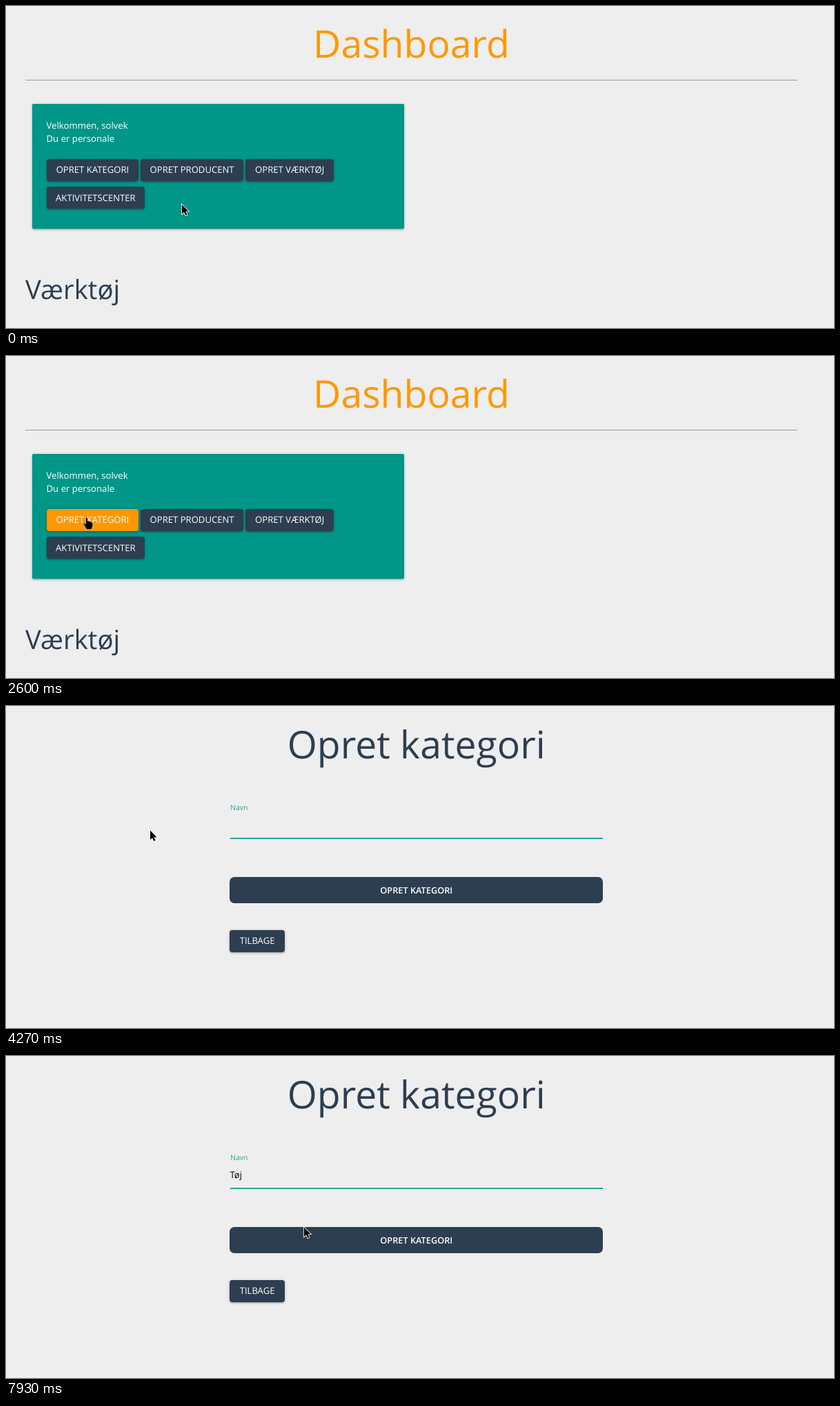
An HTML page for the animation above (8 s loop, 1200 px wide and 467 px high).

```html
<!DOCTYPE html>
<html lang="da">
<head>
<meta charset="utf-8">
<title>Dashboard</title>
<style>
  html, body { margin: 0; width: 100%; height: 100%; overflow: hidden; background: #eee; }
  body { font-family: "Open Sans", "Noto Sans", sans-serif; text-rendering: geometricPrecision; }
  #stage { position: absolute; left: 0; top: 0; width: 1200px; height: 467px; overflow: hidden; }
  #stage div { position: absolute; box-sizing: border-box; }
  .text { line-height: 0; white-space: nowrap; }
  .raised {
    box-shadow: 0 1.7px 1.7px rgba(0,0,0,.14), 0 2.5px .8px -1.7px rgba(0,0,0,.12), 0 .8px 4.2px rgba(0,0,0,.2);
  }
  .btn { background: #2c3e50; border-radius: 4px; }
  .panel { background: #fff; border: 1px solid #b4b4b4; }
  svg { position: absolute; left: 0; top: 0; overflow: visible; }
</style>
</head>
<body>
<div id="stage"></div>
<script>
const LOOP = 8000, FPS = 15;
const DARK = '#2c3e50', ORANGE = '#ff9800', TEAL = '#26a69a', GREY = '#9e9e9e';
const BODY = 13.2, TITLE = 55.3;
const stage = document.getElementById('stage');

function add(parent, cls = '') {
  const el = document.createElement('div');
  el.className = cls;
  parent.appendChild(el);
  return el;
}

function box(parent, x, y, w, h, color, cls) {
  const el = add(parent, cls);
  el.style.cssText = `left:${x}px;top:${y}px;width:${w}px;height:${h}px;` + (color ? `background:${color}` : '');
  return el;
}

// y is the baseline
function text(parent, str, x, y, size, color, extra = '') {
  const el = add(parent, 'text');
  el.textContent = str;
  el.style.cssText = `left:${x}px;top:${y - 0.388 * size}px;font-size:${size}px;color:${color};${extra}`;
  return el;
}

function centered(parent, str, x, w, y, size, color, extra = '') {
  return text(parent, str, x, y, size, color, `width:${w}px;text-align:center;${extra}`);
}

function button(parent, str, x, y, w) {
  const el = box(parent, x, y, w, 32, '', 'btn raised');
  centered(el, str, 0, w, 20.5, 13.1, '#fff');
  return el;
}

const dash = add(stage);
centered(dash, 'Dashboard', 28, 1119, 76, TITLE, ORANGE);
box(dash, 28, 107, 1119, 1, '#9a9a9a');
const card = box(dash, 37.7, 141.7, 539.6, 181.8, '#009688', 'raised');
card.style.borderRadius = '1.7px';
text(dash, 'Velkommen, solvek', 58.5, 178, BODY, '#fff');
text(dash, 'Du er personale', 58.5, 197, BODY, '#fff');
const category = button(dash, 'OPRET KATEGORI', 58.5, 222, 133.8);
button(dash, 'OPRET PRODUCENT', 195.2, 222, 148.8);
button(dash, 'OPRET VÆRKTØJ', 347.2, 222, 128);
button(dash, 'AKTIVITETSCENTER', 58.5, 262.3, 142.8);
text(dash, 'Værktøj', 28, 426, 38.4, DARK);

const form = add(stage);
centered(form, 'Opret kategori', 324.5, 540.5, 77, TITLE, DARK);
const label = text(form, 'Navn', 324.5, 177, BODY, GREY);
const value = text(form, '', 324.5, 177, BODY, '#000');
const line = box(form, 324.5, 191, 540.5, 1, GREY);
const submit = box(form, 324.2, 248.2, 540.8, 37.8, DARK);
submit.style.borderRadius = '7px';
centered(form, 'OPRET KATEGORI', 324.5, 540.5, 272, 12.74, '#fff', 'font-weight:600');
button(form, 'TILBAGE', 324.2, 325, 79.8);
const caret = box(form, 324, 162, 1, 18, '#000');

const hints = box(form, 325, 193, 168, 111, '', 'panel');
['Test', 'Træ', 'Tape', 'Tang', 'Tov'].forEach((word, i) => text(hints, word, 7, 18 + i * 21, 11.5, '#222'));

const shapes = {
  arrow: '<path d="M0 0V13.6L3.1 10.8L5.3 15.6L7.5 14.6L5.4 9.8H9.6Z" fill="#000" stroke="#fff" stroke-width="1.6" paint-order="stroke"/>',
  hand: '<path d="M-1.5 1.2Q0-.7 1.5 1.2V5.4Q3 4.6 4 6Q5.6 5.2 6.5 6.8Q8.6 6.4 8.8 8.6V12Q8.6 14 7.5 15.4V17.5H-.8V15.8Q-2.5 14-4.8 9.9Q-4.6 7.6-2.6 8.8L-1.5 10Z" fill="#000" stroke="#fff" stroke-width=".5"/>',
  beam: '<path d="M-2.5-6H-.6L0-5.5L.6-6H2.5M0-5.5V5.5M-2.5 6H-.6L0 5.5L.6 6H2.5" fill="none" stroke="#222"/>'
};
stage.insertAdjacentHTML('beforeend', '<svg width="1200" height="467"><g id="cursor"></g></svg>');
const cursor = document.getElementById('cursor');

// tick, x, y, and an optional control point for a curved approach
const path = [
  [0, 255, 288], [6, 124, 235], [21, 124, 235], [24, 117, 235], [32, 117, 235],
  [34, 116, 234], [38, 116, 234], [39, 117, 234], [45, 117, 234], [52, 403, 171],
  [55, 403, 171], [64, 209, 180.5, 215, 482], [111, 209, 180.5], [119, 432, 248.5]
];

const mix = (a, b, u) => a + (b - a) * u;
const clamp = u => Math.max(0, Math.min(1, u));
const easeOut = u => u * (2 - u);
const smooth = u => u * u * (3 - 2 * u);
const inside = (p, x, y, w, h) => p.x >= x && p.x <= x + w && p.y >= y && p.y <= y + h;

function cursorAt(k) {
  const i = path.findIndex(p => p[0] >= k);
  if (i < 1) return { x: path[0][1], y: path[0][2] };
  const [k0, x0, y0] = path[i - 1];
  const [k1, x1, y1, cx = (x0 + x1) / 2, cy = (y0 + y1) / 2] = path[i];
  const raw = (k - k0) / (k1 - k0);
  const u = i === 1 ? easeOut(raw) : smooth(raw);
  const bend = (a, c, b) => mix(mix(a, c, u), mix(c, b, u), u);
  return { x: bend(x0, cx, x1), y: bend(y0, cy, y1) };
}

// blinking restarts with every key press
function caretOn(k) {
  if (k < 56) return false;
  const start = [105, 102, 96, 56].find(s => k >= s);
  return Math.floor((k - start) / 8) % 2 === 0;
}

function draw(now) {
  const k = Math.floor(((now % LOOP) + 5) * FPS / 1000) % (LOOP * FPS / 1000);
  const onForm = k >= 42;
  dash.style.display = onForm ? 'none' : 'block';
  form.style.display = onForm ? 'block' : 'none';

  const p = cursorAt(k);
  const hover = !onForm && inside(p, 58.5, 222, 133.8, 32);
  category.style.background = hover ? ORANGE : DARK;

  const f = easeOut(clamp((k - 55) / 3));
  const focused = k >= 56;
  label.style.transformOrigin = '0 0';
  label.style.transform = `translateY(${-24.7 * f}px) scale(${mix(1, 0.8, f)})`;
  label.style.color = line.style.background = focused ? TEAL : GREY;
  line.style.height = focused ? '2px' : '1px';

  const typed = 'Tøj'.slice(0, k >= 105 ? 3 : k >= 102 ? 2 : k >= 96 ? 1 : 0);
  value.textContent = typed;
  caret.style.left = 324 + value.offsetWidth + 'px';
  caret.style.display = caretOn(k) ? 'block' : 'none';
  hints.style.display = k >= 96 && k < 102 ? 'block' : 'none';

  let kind = 'arrow';
  if (hover || k === 42) kind = 'hand';
  else if (onForm && inside(p, 324.5, 155, 540.5, 37)) kind = 'beam';
  if (cursor.dataset.kind !== kind) {
    cursor.dataset.kind = kind;
    cursor.innerHTML = shapes[kind];
  }
  cursor.setAttribute('transform', `translate(${p.x.toFixed(1)} ${p.y.toFixed(1)})`);
}

function loop() {
  draw(performance.now());
  requestAnimationFrame(loop);
}
loop();
</script>
</body>
</html>
```
